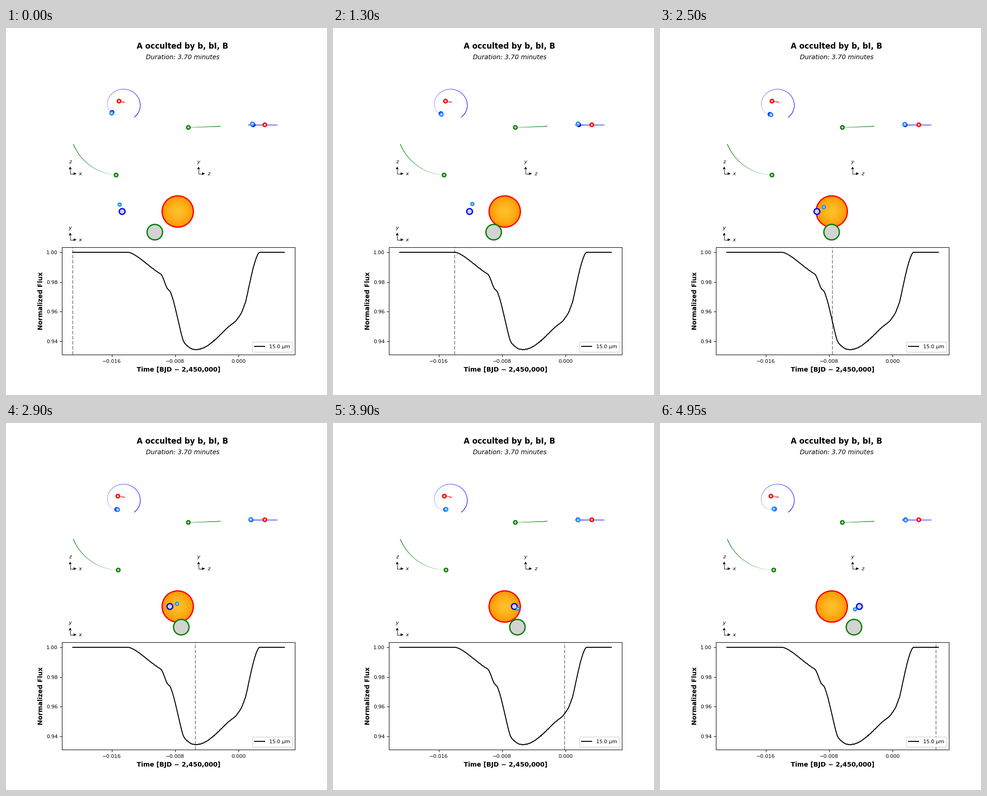
These frames come from a looping animation (700 px wide and 800 px high, 5 s). A matplotlib script:

```python
import numpy as np
import matplotlib.pyplot as plt
from matplotlib.animation import FuncAnimation
from matplotlib.collections import LineCollection
from matplotlib.colors import to_rgb
from matplotlib.patches import Circle, Polygon

W, H, DPI = 700, 800, 100
FRAMES, INTERVAL = 100, 50
T0, T1 = -0.020926, 0.005786      # time span of the light curve
DEPTH = 0.06575                   # deepest loss of flux
SCALE = 7.85                      # sky view to orbit view
STAR_X, STAR_Y = 374.5, 400
TOP_Y = 159.4                     # star height in the x-z view
SIDE_X, SIDE_Y = 564.4, 211       # star place in the z-y view
ORBIT = 29.1                      # planet orbit radius in the orbit views
COMP_Z = 161.1                    # companion distance in the orbit views
STAR_R, COMP_R, PLANET_R, MOON_R = 34.1, 16.9, 6.3, 3.3
RED, BLUE, GREEN, MOON = "red", "blue", "green", "dodgerblue"


def bodies(k):
    """Offsets (x, y) from the star on the sky and depth z, at step k."""
    phase = 0.00835 * (k - 67)
    turn = np.radians(-20 + 1.4 * k + 0.0101 * k * k)
    px, pz = SCALE * ORBIT * np.sin(phase), ORBIT * np.cos(phase)
    comp = (0.995 * k - 50, 45 + 0 * k, COMP_Z + 0 * k)
    planet = (px, 0 * k, pz)
    moon = (px + 15.6 * np.sin(turn),
            -4.6 - 12.1 * np.cos(turn - np.radians(10)),
            pz + 0.6 + 1.1 * np.cos(turn))
    return comp, planet, moon


def light_curve(k, limb=0.6):
    """Flux of a limb-darkened star behind the three opaque disks."""
    r, a = np.meshgrid((np.arange(120) + 0.5) / 120,
                       np.linspace(0, 2 * np.pi, 480, endpoint=False))
    light = r * (1 - limb * (1 - np.sqrt(1 - r * r)))
    x, y = STAR_R * r * np.cos(a), STAR_R * r * np.sin(a)
    paths = list(zip(bodies(k), (COMP_R, PLANET_R, MOON_R)))
    loss = np.zeros(len(k))
    for i in range(len(k)):
        hidden = np.zeros(r.shape, bool)
        for (bx, by, _), radius in paths:
            if np.hypot(bx[i], by[i]) < STAR_R + radius:
                hidden |= (x - bx[i]) ** 2 + (y - by[i]) ** 2 < radius ** 2
        loss[i] = light[hidden].sum()
    return 1 - DEPTH * loss / loss.max()


def side(z):
    return SIDE_X - 1.035 * z


plt.rcParams["font.family"] = "DejaVu Sans"
fig = plt.figure(figsize=(W / DPI, H / DPI), dpi=DPI, facecolor="white")
fig.text(0.55, 0.95, "A occulted by b, bI, B", ha="center", va="center",
         fontsize=12, fontweight="bold")
fig.text(0.55, 0.92, "Duration: 3.70 minutes", ha="center", va="center",
         fontsize=10, fontstyle="italic")

# Light curve
lc = fig.add_axes([0.175, 0.11, 0.725, 233.66 / H])
curve_k = np.linspace(0, 100, 400)
lc.plot(T0 + (T1 - T0) * curve_k / 100, light_curve(curve_k),
        color="k", lw=1.5, label=r"15.0 $\mu$m")
pad_t, pad_f = 0.05 * (T1 - T0), 0.05 * DEPTH
lc.set_xlim(T0 - pad_t, T1 + pad_t)
lc.set_ylim(1 - DEPTH - pad_f, 1 + pad_f)
lc.set_xticks([-0.016, -0.008, 0])
lc.set_yticks([0.94, 0.96, 0.98, 1.0])
lc.tick_params(labelsize=8)
lc.set_xlabel("Time [BJD \u2212 2,450,000]", fontsize=10, fontweight="bold",
              labelpad=4.6)
lc.set_ylabel("Normalized Flux", fontsize=10, fontweight="bold", labelpad=3.6)
lc.legend(loc="lower right", fontsize=8)
tracker = lc.axvline(T0, color="k", alpha=0.6, lw=1,
                     ls=(0, (5.55, 2.4)), snap=False)

# Stage in pixels for the three views
ax = fig.add_axes([0, 0, 1, 1])
ax.set_xlim(0, W)
ax.set_ylim(H, 0)
ax.axis("off")


def trail(x, y, color, strong=0.8, weak=0.04):
    """Line that fades to white from its first point to its last."""
    pts = np.column_stack([x, y])
    segs = np.stack([pts[:-1], pts[1:]], axis=1)
    a = np.linspace(strong, weak, len(segs))[:, None]
    cols = 1 - a + a * np.array(to_rgb(color))
    ax.add_collection(LineCollection(segs[::-1], colors=cols[::-1],
                                     linewidths=1, capstyle="projecting", zorder=1))


s = np.linspace(0, 1, 120)

# Planet: one turn around a drifting centre
turn = np.radians(32 + 343.3 * s)
reach = 31 - 1.8 * s
bx = 263.5 - 21.5 * s ** 1.5 + reach * np.sin(turn)
by = 168 - 8.6 * s ** 0.8 + reach * np.cos(turn)
trail(bx, by, BLUE)
trail(side(by - TOP_Y), SIDE_Y + 0 * s, BLUE)

# Companion: a quarter circle
arc = np.radians(157.6 - 68.3 * s)
gx, gy = 247 + 108.2 * np.cos(arc), 212.2 + 108.2 * np.sin(arc)
gz = side(gy - TOP_Y)
trail(gx, gy, GREEN)
trail(gz, 217 - 0.039 * (gz - gz[-1]), GREEN)

trail(258 - 16 * s, 161.8 - 3.2 * s + s * s, RED)


def compass(x, y, up, right):
    ax.plot([x, x, x + 9], [y - 9, y, y], color="k", lw=0.7)
    for head in ([(x, y - 15.5), (x - 3, y - 9.5), (x + 3, y - 9.5)],
                 [(x + 14, y), (x + 7.5, y - 3), (x + 7.5, y + 3)]):
        ax.add_patch(Polygon(head, fc="k", ec="none"))
    style = dict(fontsize=8, fontstyle="italic", ha="center", va="baseline")
    ax.text(x, y - 22.5, up, **style)
    ax.text(x + 21.5, y + 3.5, right, **style)


compass(140, 317.5, "z", "x")
compass(420, 317.5, "y", "z")
compass(140, 461.5, "y", "x")


def disk(x, y, r, color, z, face="lightgrey"):
    return ax.add_patch(Circle((x, y), r, fc=face, ec=color, lw=2, zorder=z))


# Star, bright in the middle and deeper orange at the rim
rim, core = np.array([255, 150, 2]) / 255, np.array([252, 193, 42]) / 255
for f in np.linspace(1, 0.02, 45):
    shade = rim + (core - rim) * (1 - f ** 1.6)
    ax.add_patch(Circle((STAR_X, STAR_Y), STAR_R * f, fc=shade, ec="none", zorder=2))
disk(STAR_X, STAR_Y, STAR_R, RED, 3, "none")

# One disk on the sky and one dot in each orbit view per body
DOT = 3.8
star_top = disk(0, TOP_Y, DOT, RED, 4)
disk(SIDE_X, SIDE_Y, DOT, RED, 4)
looks = ((COMP_R, GREEN, 4), (PLANET_R, BLUE, 5), (MOON_R, MOON, 6))
marks = [[disk(0, 0, size, color, z) for size in (r, DOT, DOT)]
         for r, color, z in looks]


def draw(k):
    now = T0 + (T1 - T0) * k / 100.1
    tracker.set_xdata([now, now])
    star = 246.5 - 4.6 * k / 99
    star_top.center = star, TOP_Y
    for (sky, top, edge), (x, y, z) in zip(marks, bodies(k)):
        sky.center = STAR_X + x, STAR_Y + y
        top.center = star + x / SCALE, TOP_Y + z
        edge.center = side(z), SIDE_Y + y / SCALE
    return [tracker, star_top] + sum(marks, [])


anim = FuncAnimation(fig, draw, frames=FRAMES, interval=INTERVAL,
                     repeat=True, repeat_delay=0, blit=False)
plt.show()
```
